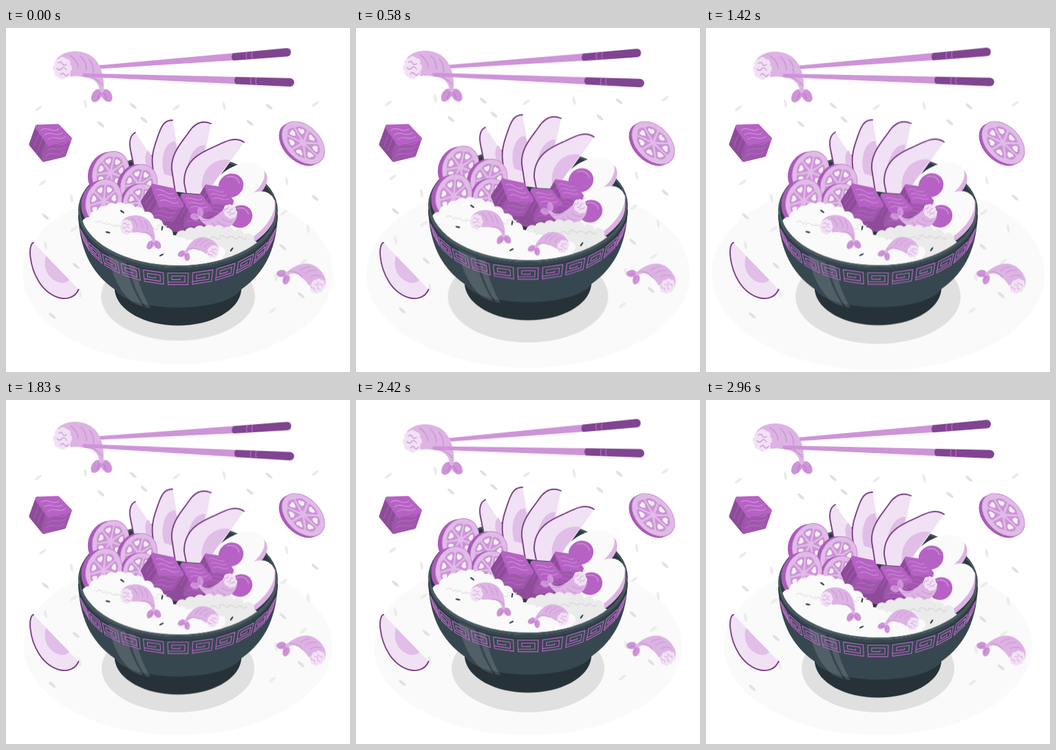
Write an HTML page that moves like this. It is 500x500 px and loops after 3 s.

```html
<!DOCTYPE html>
<html lang="en">
<head>
<meta charset="utf-8">
<title>Rice bowl</title>
<style>
  html, body { margin: 0; width: 100%; height: 100%; overflow: hidden; background: #fff; }
  svg { display: block; width: 100vw; height: 100vh; }
  .pulse { transform-box: fill-box; transform-origin: center; }
  #sticks { transform-origin: 243.5px 69px; }
</style>
</head>
<body>
<svg viewBox="0 0 500 500" fill="none" stroke-linecap="round" stroke-linejoin="round">
  <defs>
    <clipPath id="inside"><path d="M108.500 0H391.500V265A141.500 80 0 0 1 108.500 265Z"/></clipPath>
    <g id="shrimp">
      <path fill="#CE93D8" d="M138 90C130 86 123 96 124 104C126 111 135 108 139 99C143 108 152 110 154.500 104C156 96 149 86 141 90Z"/>
      <path stroke="#BA68C8" stroke-width=".9" d="M138 92Q134 97 133 103M140 92Q145 97 146 103"/>
      <path fill="#DCB3E3" d="M71 50C78 33 104 30 121 39C138 48 144 72 142 93Q139 96 136 92C136 80 127 73 116 72C106 70 99 70 94 71C90 62 80 54 71 50Z"/>
      <path stroke="#CE93D8" stroke-width="1.500" d="M93 40Q104 47 105 58M108 41Q117 49 117 61M121 46Q128 54 127 65M115 71Q129 69 140 83"/>
      <g id="fluff"></g>
      <path stroke="#CE93D8" stroke-width="1.300" d="M76 51q4-3 6 1t6 1M74 59q4 4 7 0t7 2M79 68q4-4 6 0t6-1"/>
    </g>
    <g id="cube"></g>
  </defs>

  <ellipse class="pulse" cx="250" cy="358" rx="224" ry="129.500" fill="#FAFAFA"/>
  <ellipse class="pulse" cx="250" cy="390" rx="111" ry="64" fill="#E0E0E0"/>

  <g id="bob">
    <g id="grains"></g>
    <path fill="#263238" d="M158 368V382C162 411 202 432.500 250 432.500S338 411 342 382V368Z"/>
    <ellipse cx="250" cy="265" rx="145" ry="83" fill="#37474F"/>
    <ellipse cx="250" cy="265" rx="143" ry="81" fill="#2C3A41" stroke="#607079" stroke-width=".9"/>
    <g id="food" clip-path="url(#inside)"></g>
    <path fill="#37474F" d="M105 265A145 83 0 0 0 395 265C395 318 377 356 342 380C318 415 182 415 158 380C123 356 105 318 105 265Z"/>
    <path stroke="#607079" d="M107 265A143 81 0 0 0 393 265"/>
    <path stroke="#263238" stroke-width="1.200" d="M105.500 272A144.500 82 0 0 0 394.500 272"/>
    <g fill="#fff" fill-opacity=".13">
      <path d="M149 330C153 359 166 384 184 399Q191 403 200 405C187 387 178 365 174 341Z"/>
      <path d="M178 343C182 366 191 388 203 406L210 407C198 387 191 366 188 346Z"/>
    </g>
    <path id="keys" stroke="#BA68C8" stroke-width="1.100" stroke-linecap="butt"/>
  </g>

  <g id="loose"></g>

  <g id="sticks">
    <path fill="#CE93D8" d="M128 55L330 36.500V47L128 60Z"/>
    <path fill="#804490" d="M330 36.500L408 29Q414 29.500 414 35Q414 40.500 409 41.300L330 47.200Q325.500 42 330 36.500Z"/>
    <path stroke="#BA68C8" stroke-width="1.300" d="M350 35.200q-2 5 0 9.700M358 34.500q-2 5 0 9.700"/>
    <use href="#shrimp"/>
    <path fill="#CE93D8" d="M113 66L334 71V81.200L113 71Q109 68.500 113 66Z"/>
    <path fill="#804490" d="M334 71L413 72.800Q419 74 419 79Q418.500 84.500 413 85L334 81.400Q330 76 334 71Z"/>
    <path stroke="#BA68C8" stroke-width="1.300" d="M356.500 72q-2 5 0 9.700M364 72.300q-2 5 0 9.700"/>
  </g>
</svg>
<script>
const $ = id => document.getElementById(id);
const range = (n, fn) => Array.from({ length: n }, (_, i) => fn(i));
const path = (d, fill) => `<path d="${d}" fill="${fill}"/>`;
const line = (d, color, w) => `<path d="${d}" stroke="${color}" stroke-width="${w}"/>`;
const dot = (x, y, r, fill) => `<circle cx="${x}" cy="${y}" r="${r}" fill="${fill}"/>`;
const mix = (a, b, k) => [a[0] + (b[0] - a[0]) * k, a[1] + (b[1] - a[1]) * k];
const poly = pts => 'M' + pts.map(p => p.map(n => n.toFixed(1)).join(' ')).join('L');
const white = '#FAFAFA', grey = '#EBEBEB';

let seed = 7;
const rand = () => (seed = seed * 16807 % 2147483647) / 2147483647;
const jitter = r => (rand() * 2 - 1) * r;

function grain(x, y, angle, fill, len = 6.3, w = 2.1) {
  return `<ellipse rx="${len}" ry="${w}" fill="${fill}" transform="translate(${x} ${y})rotate(${angle})"/>`;
}

function falling(x, y, i) {
  return grain(x + jitter(4), y + jitter(5), [-35, 80, 40][i % 3], i % 3 > 1 ? '#E0E0E0' : grey);
}

function shrimp(x, y, s, rot, flip = 1) {
  return `<use href="#shrimp" transform="translate(${x} ${y})rotate(${rot})scale(${s * flip} ${s})translate(-82 -58)"/>`;
}

function cube(x, y, s, rot) {
  return `<use href="#cube" transform="translate(${x} ${y})rotate(${rot})scale(${s})translate(-65 -167)"/>`;
}

// Cut tomato: dark skin behind a face with seeded wedges
function tomato(x, y, rx, ry, rot, dx, dy) {
  const wedges = range(7, i => `<g transform="rotate(${i * 360 / 7 + 10})">` +
    path('M0 -1.300L2.800 -6.700Q0 -9 -2.800 -6.700Z', '#CE93D8') +
    path('M0 -4.200C-2.200 -5.400 -1.700 -7.400 -.2 -6.500C1.600 -7.500 2.100 -5.400 0 -4.200Z', '#FAF2FB') + '</g>').join('');
  const place = (px, py) => `translate(${px} ${py})rotate(${rot})scale(${rx / 10} ${ry / 10})`;
  return `<circle r="10" fill="#AC5ABA" transform="${place(x + dx, y + dy)}"/>` +
    `<g transform="${place(x, y)}"><circle r="9.900" fill="#DFBBE6" stroke="#C583D0" stroke-width=".3"/>${wedges}</g>`;
}

function avocado(skin, close, core) {
  return path(skin + close + 'Z', '#F1E1F4') + path(core, '#E0BEE7') + line(skin, '#7B3F88', 1.9);
}

function face(a, b, c, d, fill, vein) {
  const veins = [.2, .5, .8].map(k => {
    const p = mix(a, d, k), q = mix(b, c, k), m = mix(p, q, .35), n = mix(p, q, .65);
    return line(`M${mix(p, q, .06)}C${m[0]} ${m[1] - 6} ${n[0]} ${n[1] + 6} ${mix(p, q, .94)}`, vein, 1.1);
  });
  return `<path d="${poly([a, b, c, d])}Z" fill="${fill}" stroke="${fill}" stroke-width="7"/>` + veins.join('');
}

function egg(x, y, rx, ry, rot, yx, yy, yr) {
  const oval = (px, py, fill) =>
    `<path transform="translate(${px} ${py})rotate(${rot})" fill="${fill}" d="M${-rx} 0C${-rx} ${-ry * 1.25} ${rx} ${-ry * 1.1} ${rx} 0S${-rx} ${ry * 1.25} ${-rx} 0Z"/>`;
  return oval(x + 4, y + 6, '#DCB3E3') + oval(x, y, white) +
    `<ellipse cx="${yx}" cy="${yy}" rx="${yr}" ry="${yr * .92}" transform="rotate(-30 ${yx} ${yy})" fill="#B662C4"/>` +
    line(`M${yx - yr * .3} ${yy - yr * .68}Q${yx + yr * .45} ${yy - yr * .85} ${yx + yr * .65} ${yy - yr * .2}`, '#CE93D8', 1.5);
}

// Round bumps spaced along a curve from a to b, bent towards m
function bumps(a, m, b, n, r, fill) {
  return range(n, i => {
    const k = i / (n - 1), p = mix(mix(a, m, k), mix(m, b, k), k);
    return dot(p[0], p[1], r, fill);
  }).join('');
}

function squiggles(n, x, y, w, h, color) {
  return range(n, i => line(`M${x + w * (i + rand() * .6) / n} ${y + rand() * h}q4-4 8 0t6-1`, color, 1.3)).join('');
}

$('fluff').innerHTML = dot(82, 58, 8, '#F1E1F4') + range(8, i => {
  const a = i * Math.PI / 4;
  return dot(82 + 8 * Math.cos(a), 58.5 + 10.5 * Math.sin(a), 6, '#F1E1F4');
}).join('');

{
  const nw = [46, 144], ne = [75, 143], e = [92, 161], se = [84, 184], s = [55, 191], w = [37, 169], mid = [62, 167];
  $('cube').innerHTML = face(w, nw, mid, s, '#8D4C99', '#A75DB4') +
    face(mid, e, se, s, '#9F57AC', '#BA68C8') + face(nw, ne, e, mid, '#B662C4', '#CE93D8');
}

// One row above the bowl, a few below it, and a zigzag down each side
$('grains').innerHTML =
  range(7, i => falling(51 + 66 * i, 113, i)).join('') +
  [139, 199, 353].map(x => falling(x, 138, 2)).join('') +
  range(9, i => {
    const y = 222 + 24 * i, side = i % 2 ? 20 : -20;
    return falling(70 + side + 2 * i, y, i) + falling(431 + side - 3 * i, y, i + 1);
  }).join('');

$('food').innerHTML =
  avocado('M188 152C178 157 179 170 182 182L188 212', 'L225 225L222 203', 'M207 178C198 185 203 205 214 218L226 212Z') +
  avocado('M242 134C231 134 227 141 223 151C217 168 211 182 213 200L217 232', 'L262 240', 'M246 165C231 163 223 192 230 212L260 222Z') +
  avocado('M298 139C284 133 274 139 266 151C256 166 239 182 241 206L246 238', 'L278 240', 'M290 170C272 168 261 196 262 222L280 222Z') +
  avocado('M346 166C333 157 318 165 304 172C288 179 258 190 259 225L262 240', 'L292 242', 'M326 192C304 187 281 205 285 236L300 228Z') +
  tomato(152, 210, 26, 32, 25, -6, 1) + tomato(193, 228, 26, 31, 28, -5, 0) +
  tomato(196, 254, 26, 28, 25, -4, 0) + tomato(142, 252, 26, 33, 18, -6, 1) +
  egg(338, 225, 41, 28, -30, 327, 229, 18.5) + egg(351, 275, 47, 31, -42, 341, 274, 17.5) +
  '<ellipse cx="262" cy="272" rx="50" ry="26" fill="#8D4C99"/>' +
  cube(304, 253, .86, 10) + cube(272, 266, .9, 6) + cube(227, 257, 1, 14) +
  shrimp(326, 267, .68, 140) +
  path('M246 350V303L281 296H324L352 304L366 312L330 350Z', grey) +
  bumps([256, 303], [300, 285], [352, 307], 8, 9, grey) +
  path('M110 284L160 262L206 270L232 288L242 308L284 316L312 326L318 350H150Z', white) +
  bumps([120, 285], [168, 235], [233, 300], 10, 10, white) +
  bumps([244, 309], [270, 317], [311, 326], 6, 8, white) +
  squiggles(7, 128, 276, 100, 24, '#E3E3E3') + squiggles(5, 275, 300, 72, 14, '#D8D8D8') +
  shrimp(175, 289, .68, -2) + shrimp(301, 325, .6, 28, -1) +
  [[169, 267], [148, 297], [227, 291], [226, 330], [328, 322]].map(([x, y], i) =>
    grain(x, y, [35, 12, -80, -28, -55][i], '#37474F', 3.6, 1.2)).join('');

// Key pattern wrapped round the bowl
const wrap = (u, v) => {
  const a = Math.max(-78, Math.min(78, u)) * Math.PI / 180;
  return [250 + (143 - v * .3) * Math.sin(a), 283 + v + 82 * Math.cos(a)];
};
const frame = [[-1, -1], [1, -1], [1, 1], [-1, 1], [-1, -1]];
const spiral = [[-1, .54], [.68, .54], [.68, -.52], [-.62, -.52], [-.62, .08], [.22, .08], [.22, -.18]];
$('keys').setAttribute('d', range(11, i => [frame, spiral].map(shape =>
  poly(shape.map(([u, v]) => wrap((i - 5) * 14.4 + u * 5.9, v * 8.3)))).join('')).join(''));

$('loose').innerHTML =
  cube(65, 167, 1, 0) +
  tomato(432, 167, 37, 24.5, 45, -4, 2) +
  avocado('M40 312C32 314 33 345 48 369C64 395 96 402 105.500 380', '', 'M58 331C54 345 58 358 69 366C79 373 89 371 92 366Z') +
  shrimp(453, 375, .73, 51, -1);

// Phase lead shared by every loop, in ms
const lead = 22;
function loop(el, duration, table, fn) {
  const frames = table.map(([offset, v]) => ({ offset, transform: fn(v) }));
  el.animate(frames, { duration, delay: -lead, iterations: Infinity, easing: 'linear' }).startTime = 0;
}

loop($('bob'), 1500, [[0, .3], [.5, -9.7], [1, .3]], y => `translateY(${y}px)`);
loop($('sticks'), 1500, [[0, 0], [.25, 1], [.75, -1], [1, 0]], a => `rotate(${a}deg)`);
for (const el of document.querySelectorAll('.pulse')) {
  loop(el, 3000, [[0, 1], [.1, 1.1], [.3, 1], [.4, 1], [.5, 1.1], [.6, 1], [1, 1]], s => `scale(${s})`);
}
</script>
</body>
</html>
```
